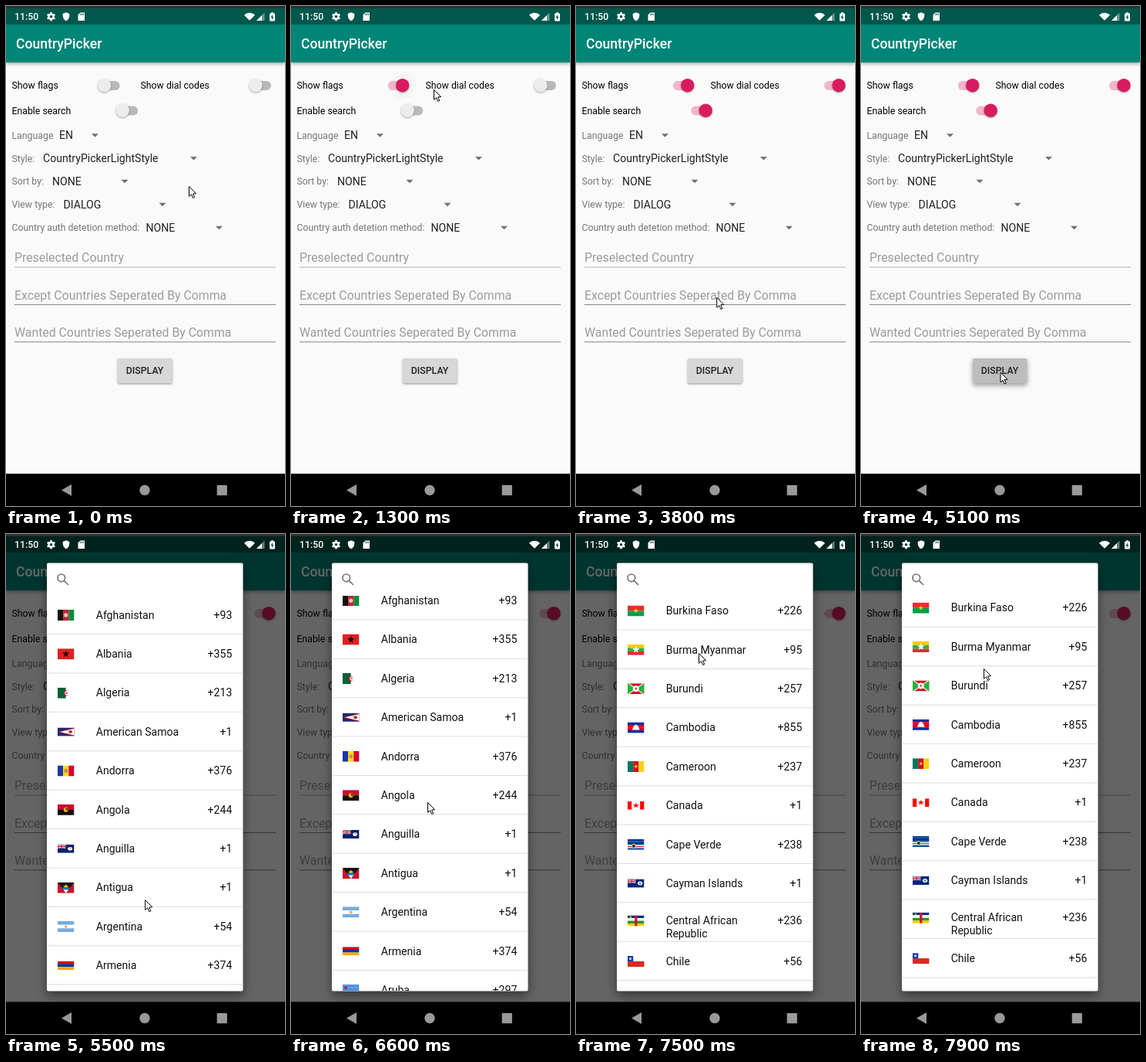
Write an HTML page with a canvas that moves like this. It is 362 px wide and 647 px high and loops after 8 s.

```html
<!DOCTYPE html>
<html lang="en">
<head>
<meta charset="utf-8">
<title>CountryPicker</title>
<style>
  html, body { margin: 0; width: 100%; height: 100%; overflow: hidden; background: #000; }
  canvas { display: block; width: 362px; height: 647px; }
</style>
</head>
<body>
<canvas id="stage"></canvas>
<script>
const W = 362, H = 647, LOOP = 8000, STEP = 100;
const ROW = 50.39, LIST_TOP = 79.6;
const ACCENT = '#d81b60', INK = '#212121', GREY = '#757575';
const canvas = document.getElementById('stage');
const dpr = window.devicePixelRatio || 1;
canvas.width = W * dpr;
canvas.height = H * dpr;
const c = canvas.getContext('2d');

// name | dial code | flag parts: h/v stripes, d disc, p star, g polygon, t hoist triangle, u jack; ~ means 2:1
const countries = `Afghanistan|93|v:111,c8202a,0a8a3a d:e9c9c0
Albania|355|h:e41e20 p:111,11,7,5
Algeria|213|v:006233,fff d:d21034,11,7,3.4 d:fff,12.3,7,2.7 p:d21034,12,7,1.7
American Samoa|1|~h:1d2a6e g:bf0a30,22,0,0,7,22,14 g:fff,22,1.5,3,7,22,12.5 d:8b4a2b,17,7,2.6
Andorra|376|v:1d35a5,fedd00,d50032 d:c2905a
Angola|244|h:cc092f,111 d:ffcb00,11,7,3 d:701018,11.8,6.5,1.9 p:ffcb00,11,7,1.6
Anguilla|1|~h:012169 u d:fff,16.5,7,3 d:f0a050,16.5,6,1.3
Antigua|1|h:ce1126 g:111,0,0,22,0,11,14 p:fcd116,11,6,4 g:0072c6,5,6.5,17,6.5,11,14 g:fff,7.5,9.5,14.5,9.5,11,14
Argentina|54|h:74acdf,fff,74acdf d:f0a040,11,7,1.7
Armenia|374|~h:d90012,0033a0,f2a800
Aruba|297|h:4189dd,4189dd,4189dd,4189dd,4189dd,f9d616,4189dd,f9d616,4189dd p:d21034,4,4,3
Australia|61|~h:012169 u p:fff,5,11,2 p:fff,16,7,2
Austria|43|h:ed2939,fff,ed2939
Azerbaijan|994|~h:00b5e2,ef3340,509e2f d:fff
Bahamas|1|~h:00778b,ffc72c,00778b t:111
Bahrain|973|v:fff,ce1126,ce1126
Bangladesh|880|h:006a4e d:f42a41,10,7,4
Barbados|1|v:00267f,ffc726,00267f p:111
Belarus|375|~h:c8313e,c8313e,4aa657
Belgium|32|v:111,fae042,ed2939
Belize|501|h:ce1126,003f87,003f87,003f87,003f87,ce1126 d:fff,11,7,4
Benin|229|h:fcd116,e8112d v:008751,,
Bermuda|1|~h:cf142b u d:fff,16.5,7,3.2 d:cf6a50,16.5,7,1.7
Bhutan|975|h:ff5b1f g:ffd520,0,0,22,0,0,14 g:fff,5,12,8,6,17,2,14,7,9,10
Bolivia|591|h:d52b1e,f9e300,007934 d:a06a20,11,7,2.1
Bosnia and/Herzegovina|387|~h:002395 g:fecb00,6,0,18,0,18,14 p:fff,7,5,1.3 p:fff,12,10,1.3
Botswana|267|h:75aadb,75aadb,75aadb,fff,111,fff,75aadb,75aadb,75aadb
Brazil|55|h:009b3a g:fedf00,2,7,11,1,20,7,11,13 d:002776,11,7,3.2
British Indian Ocean/Territory|246|~h:fff,2050a0,fff,2050a0,fff,2050a0,fff,2050a0 u p:3c8060,16.5,7,3.5
British Virgin Islands|1|~h:00247d u d:2a8a50,16.5,7,3.2 d:fff,16.5,7,1.3
Brunei|673|~h:f7e017 g:fff,0,0,22,8,22,11,0,3 g:111,0,3,22,11,22,14,0,6 d:cf1126,11,7,2.7
Bulgaria|359|h:fff,00966e,d62612
Burkina Faso|226|h:ef2b2d,009e49 p:fcd116,11,7,3.3
Burma Myanmar|95|h:fecb00,34b233,ea2839 p:fff,11,7,5
Burundi|257|h:ce1126 g:1eb53a,0,0,11,7,0,14 g:1eb53a,22,0,11,7,22,14 g:fff,0,0,2,0,22,14,20,14 g:fff,22,0,20,0,0,14,2,14 d:fff,11,7,4 p:ce1126,11,7,2
Cambodia|855|h:032ea1,e00025,e00025,032ea1 g:fff,6,10,8,5,11,3,14,5,16,10
Cameroon|237|v:007a5e,ce1126,fcd116 p:fcd116
Canada|1|~v:f00,fff,fff,f00 p:f00,11,7,4.5
Cape Verde|238|h:003893,003893,003893,003893,003893,003893,fff,cf2027,fff,003893,003893 d:f7d116,8,9,3 d:003893,8,9,2
Cayman Islands|1|~h:00247d u d:fff,16.5,7,3.2 d:60a070,16.5,7,1.8
Central African/Republic|236|h:003082,fff,289728,ffce00 v:,,,d21034,,, p:ffce00,4,2.4,2
Chile|56|h:fff,d52b1e v:0039a6,, h:,d52b1e p:fff,3.6,3.6,2.4
China|86|h:de2910 p:ffde00,4,4,3`.split('\n').map(line => {
  const [name, code, flag] = line.split('|');
  return { lines: name.split('/'), code: '+' + code, wide: flag[0] === '~', parts: flag.replace('~', '').split(' ') };
});

const clamp = v => Math.max(0, Math.min(1, v));
const mix = (a, b, p) => a + (b - a) * p;
const span = (t, a, b) => clamp((t - a) / (b - a));

function box(x, y, w, h, fill, r = 0) {
  c.fillStyle = fill;
  c.beginPath();
  c.roundRect(x, y, w, h, r);
  c.fill();
}
function disc(x, y, r, fill) {
  c.fillStyle = fill;
  c.beginPath();
  c.arc(x, y, r, 0, Math.PI * 2);
  c.fill();
}
function poly(pts, fill) {
  c.fillStyle = fill;
  c.beginPath();
  for (let i = 0; i < pts.length; i += 2) c.lineTo(pts[i], pts[i + 1]);
  c.closePath();
  c.fill();
}
function star(x, y, r, fill) {
  const pts = [];
  for (let i = 0; i < 10; i++) {
    const a = i * Math.PI / 5 - Math.PI / 2, k = i % 2 ? r * 0.42 : r;
    pts.push(x + k * Math.cos(a), y + k * Math.sin(a));
  }
  poly(pts, fill);
}
function text(s, x, y, size, fill, weight = 400, align = 'left') {
  c.font = `${weight} ${size}px Roboto, sans-serif`;
  c.textAlign = align;
  c.fillStyle = fill;
  c.fillText(s, x, y + size * 0.355);
}
function shadow(blur, dy, alpha, draw) {
  c.save();
  c.shadowColor = `rgba(0,0,0,${alpha})`;
  c.shadowBlur = blur * dpr;
  c.shadowOffsetY = dy * dpr;
  draw();
  c.restore();
}

function jack() {
  c.save();
  c.beginPath();
  c.rect(0, 0, 11, 7);
  c.clip();
  const cross = (color, w, diag) => {
    c.strokeStyle = color;
    c.lineWidth = w;
    c.beginPath();
    if (diag) { c.moveTo(0, 0); c.lineTo(11, 7); c.moveTo(11, 0); c.lineTo(0, 7); }
    else { c.moveTo(5.5, 0); c.lineTo(5.5, 7); c.moveTo(0, 3.5); c.lineTo(11, 3.5); }
    c.stroke();
  };
  box(0, 0, 11, 7, '#012169');
  cross('#fff', 1.5, true);
  cross('#c8102e', 0.6, true);
  cross('#fff', 2.4);
  cross('#c8102e', 1.3);
  c.restore();
}

function drawFlag({ parts, wide }, cy) {
  const h = wide ? 11 : 14;
  c.save();
  c.translate(67, cy - h / 2);
  c.scale(21.5 / 22, h / 14);
  c.beginPath();
  c.rect(0, 0, 22, 14);
  c.clip();
  for (const part of parts) {
    const [color, ...n] = part.slice(2).split(',');
    const all = [color, ...n], k = all.length, fill = '#' + color;
    const [x = 11, y = 7, r = 2.6] = n.map(Number);
    if (part[0] === 'h') all.forEach((s, i) => s && box(0, i * 14 / k, 22, 14 / k + 0.1, '#' + s));
    if (part[0] === 'v') all.forEach((s, i) => s && box(i * 22 / k, 0, 22 / k + 0.1, k === 3 && !n[0] && n.length && color === '0039a6' ? 7 : 14, '#' + s));
    if (part[0] === 'd') disc(x, y, r, fill);
    if (part[0] === 'p') star(x, y, r, fill);
    if (part[0] === 'g') poly(n.map(Number), fill);
    if (part[0] === 't') poly([0, 0, 9, 7, 0, 14], fill);
    if (part[0] === 'u') jack();
  }
  c.restore();
}

function toggle(x, y, on, ripple) {
  if (ripple) disc(x + 17, y - 0.5, 18, `rgba(0,0,0,${0.055 * ripple})`);
  box(x - 2, y - 6, 22, 12, on ? '#f0b6cc' : '#b9b9b9', 6);
  shadow(2.5, 1, 0.35, () => disc(x + (on ? 17 : 0), y - 0.3, 8.7, on ? ACCENT : '#ececec'));
}

function spinner(label, value, x, arrow, y) {
  text(label, 7.5, y, 12.3, GREY);
  text(value, x, y, 14.08, INK);
  poly([arrow - 4.5, y - 2.3, arrow + 4.5, y - 2.3, arrow, y + 2.3], '#707070');
}

function field(hint, y, line) {
  text(hint, 11, y, 15.84, '#9b9b9b');
  box(11, y + 12, 339, 1, line);
}

function statusIcons() {
  const white = '#fff', back = '#00463c';
  text('11:50', 11, 14, 12.3, white, 500);
  for (let i = 0; i < 6; i++) {
    c.save();
    c.translate(58.5, 13.7);
    c.rotate(i * Math.PI / 3);
    box(-1.3, -5.6, 2.6, 4, white, 0.4);
    c.restore();
  }
  disc(58.5, 13.7, 4.2, white);
  disc(58.5, 13.7, 1.8, back);
  c.fillStyle = white;
  c.beginPath();
  c.moveTo(78, 8.3);
  c.lineTo(82.3, 10);
  c.bezierCurveTo(82.5, 15, 81, 18, 78, 19.3);
  c.bezierCurveTo(75, 18, 73.5, 15, 73.7, 10);
  c.fill();
  poly([96.5, 8.5, 102, 8.5, 102, 19, 93.5, 19, 93.5, 11.5], white);
  for (let i = 0; i < 3; i++) box(96.3 + i * 1.8, 9.7, 0.9, 2.2, back);
  c.fillStyle = white;
  c.beginPath();
  c.moveTo(316, 18.8);
  c.arc(316, 18.8, 10, -Math.PI * 0.75, -Math.PI * 0.25);
  c.fill();
  poly([325, 19, 335.5, 19, 335.5, 8.5], 'rgba(255,255,255,.4)');
  poly([325, 19, 332, 19, 332, 12], white);
  box(342, 9.5, 7, 10, white, 0.8);
  box(344, 8.3, 3, 2, white);
  poly([346, 11, 343.6, 15, 345.2, 15, 345, 18, 347.4, 14, 345.8, 14], back);
}

function form(t) {
  box(0, 0, W, 605.5, '#fafafa');
  shadow(4, 1.5, 0.35, () => box(0, 3, W, 70, '#008577'));
  text('CountryPicker', 13, 49.2, 17.6, '#fff', 500);

  const ripple = at => t >= at ? 1 - span(t, at, at + 300) : 0;
  text('Show flags', 7.5, 103, 12.3, '#000');
  toggle(127.7, 103, t >= 1100, ripple(1100));
  text('Show dial codes', 174.5, 103, 12.3, '#000');
  toggle(324, 103, t >= 2700, ripple(2700));
  text('Enable search', 7.5, 135.5, 12.3, '#000');
  toggle(151.2, 135.5, t >= 3300, ripple(3300));

  spinner('Language', 'EN', 69, 115.5, 167.5);
  spinner('Style:', 'CountryPickerLightStyle', 48, 243.5, 197.3);
  spinner('Sort by:', 'NONE', 60, 154, 227);
  spinner('View type:', 'DIALOG', 74.5, 203, 257);
  spinner('Country auth detetion method:', 'NONE', 181.5, 276.5, 287);

  field('Preselected Country', 325.5, '#b4b4b4');
  field('Except Countries Seperated By Comma', 374, '#858585');
  field('Wanted Countries Seperated By Comma', 422.3, '#858585');

  const down = t >= 5100;
  shadow(down ? 6 : 3, down ? 3 : 1.2, 0.38, () =>
    box(145, 456, 70.5, 32, down ? '#bdbdbd' : '#d6d7d7', 2));
  text('DISPLAY', 180, 472, 12.3, INK, 500, 'center');

  box(0, 3, W, 21, '#00574b');
}

function navBar() {
  const tone = '#999';
  box(0, 605.5, W, H - 605.5, '#000');
  poly([72, 626.5, 85, 619, 85, 634], tone);
  disc(180, 626.5, 6.7, tone);
  box(273.7, 620, 13.2, 13.2, tone, 1);
}

// Slow drag, quick swipe, decelerating fling, then a short settle.
function scrollAt(t) {
  if (t < 6600) return 18.7 * span(t, 6400, 6600);
  if (t < 6820) return mix(18.7, 212, span(t, 6600, 6820) ** 1.4);
  const fling = 1 - (1 - span(t, 6820, 7500)) ** 1.96;
  return mix(212, 1618, fling) + 3.7 * span(t, 7600, 7900);
}

function dialog(t) {
  const p = span(t, 5230, 5500);
  if (!p) return;
  const ease = 1 - (1 - p) ** 2;
  box(0, 3, W, 602.5, `rgba(0,0,0,${0.6 * ease})`);
  c.save();
  c.globalAlpha = ease;
  c.translate(180, 314.5);
  c.scale(mix(0.9, 1, ease), mix(0.9, 1, ease));
  c.translate(-180, -314.5);
  shadow(14, 6, 0.45, () => box(53, 37.5, 254.5, 554, '#fff', 2));

  c.strokeStyle = GREY;
  c.lineWidth = 1.7;
  c.beginPath();
  c.arc(71.8, 56.8, 4.8, 0, Math.PI * 2);
  c.moveTo(75.3, 60.3);
  c.lineTo(81, 66);
  c.stroke();

  c.beginPath();
  c.rect(53, 80, 254.5, 511);
  c.clip();
  const scroll = scrollAt(t);
  countries.forEach((row, i) => {
    const top = LIST_TOP + i * ROW - scroll;
    if (top > 592 || top < 80 - ROW) return;
    const y = top + 25.1 - (row.lines.length > 1 ? 2.1 : 0);
    drawFlag(row, y + 0.2);
    row.lines.forEach((s, k) => text(s, 116.7, y + k * 16.5, 14.08, '#111'));
    text(row.code, 293.3, y, 14.08, '#111', 400, 'right');
    box(53, top + ROW - 0.9, 254.5, 1, '#dcdcdc');
  });
  c.restore();
}

// time, x, y of the pointer tip
const trail = [
  [0, 237, 233], [800, 135, 101], [1050, 135, 101], [1450, 215, 112], [1900, 336, 90],
  [2100, 335, 101], [2200, 335, 101], [2400, 334, 109], [2699, 334, 109], [2700, 172, 138],
  [3000, 160, 136], [3200, 160, 136], [4100, 190, 461], [4300, 181, 474], [5900, 180, 473],
  [6400, 178, 366], [6600, 177, 347], [6820, 160, 154], [7600, 159, 154], [7900, 159, 174]
];

function pointer(t) {
  let i = 0;
  while (i < trail.length - 2 && t >= trail[i + 1][0]) i++;
  const [t0, x0, y0] = trail[i], [t1, x1, y1] = trail[i + 1];
  let p = span(t, t0, t1);
  if (t1 - t0 > 700) p = p * p * (3 - 2 * p);
  // The pointer waits for the click before heading to the next control.
  if (t0 === 2400) p = 0;
  c.save();
  c.translate(mix(x0, x1, p) + 0.5, mix(y0, y1, p) + 0.5);
  c.lineWidth = 1;
  c.lineJoin = 'round';
  c.strokeStyle = '#000';
  poly([0, 0, 0, 12.8, 3, 10.2, 5.2, 15, 7.2, 14.1, 5.1, 9.5, 9, 9.2], '#fff');
  c.stroke();
  c.restore();
}

function frame(now) {
  const t = Math.floor(now % LOOP / STEP) * STEP;
  c.setTransform(dpr, 0, 0, dpr, 0, 0);
  c.clearRect(0, 0, W, H);
  form(t);
  dialog(t);
  box(0, 0, W, 3, '#2e3133');
  statusIcons();
  navBar();
  pointer(t);
}

let start;
function tick(now) {
  start ??= now;
  frame(Math.max(0, now - start));
  requestAnimationFrame(tick);
}
requestAnimationFrame(tick);
</script>
</body>
</html>
```
